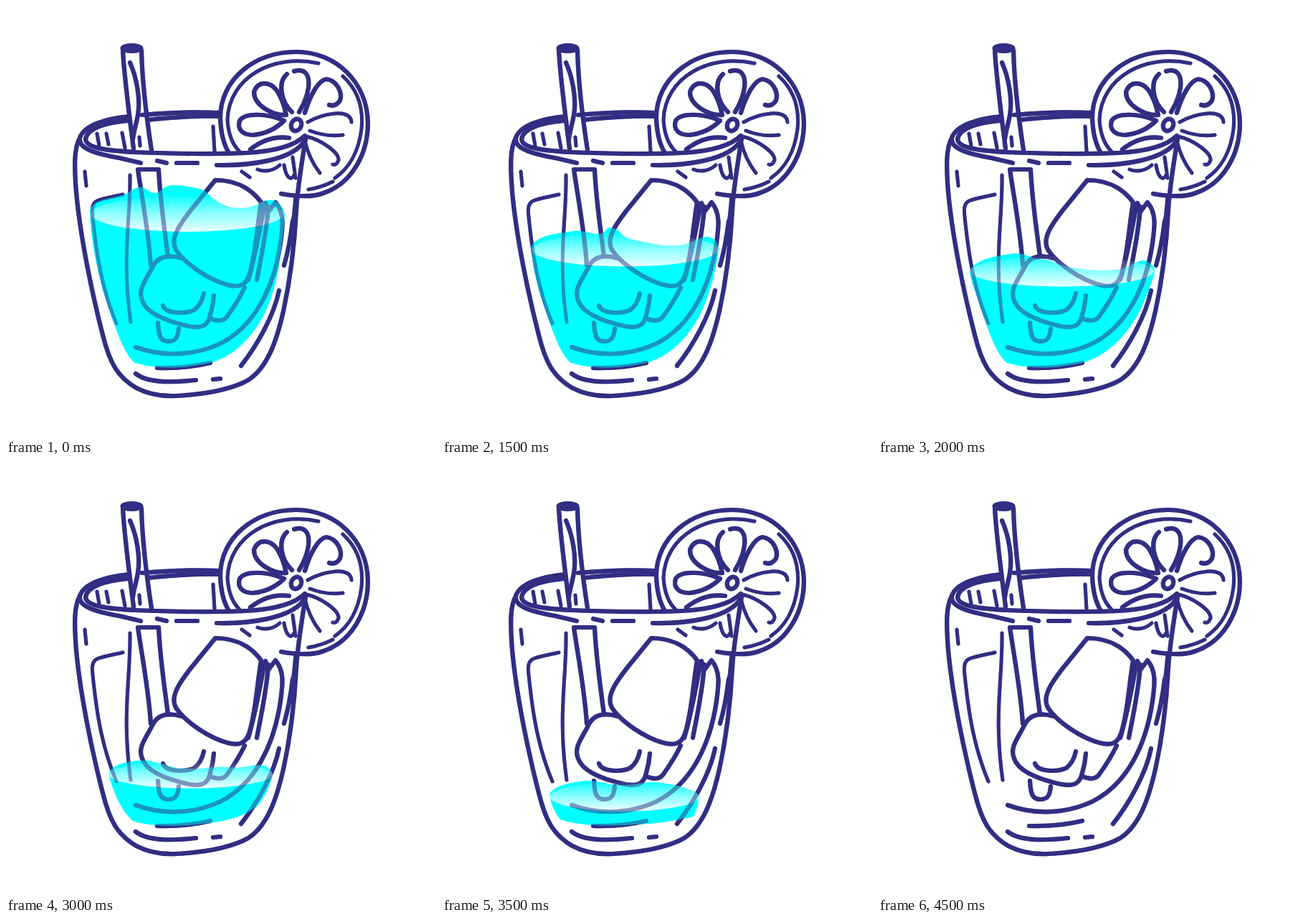
Animation, 600 px wide and 600 px high, one loop 6.5 s. Source, as an HTML page:

```html
<!DOCTYPE html>
<html lang="en">
<head>
<meta charset="utf-8">
<title>Emptying drink</title>
<style>
  html, body { margin: 0; width: 100%; height: 100%; overflow: hidden; background: #fff; }
  svg { display: block; width: 100vw; height: 100vh; }
  .art { fill: none; stroke: #312e83; stroke-width: 6.2; stroke-linecap: round; stroke-linejoin: round; }
  .thin { stroke-width: 5; }
  .bold { stroke-width: 7.4; }
  .solid { fill: #312e83; stroke-width: 2; }
  .level { fill: #0ff; visibility: hidden; animation: show 6500ms step-end infinite; animation-delay: calc(500ms + var(--i) * 500ms); }
  .full { animation-name: showFull; animation-delay: 0ms; }
  .level ellipse { fill: url(#sheen); }
  @keyframes show { 0% { visibility: visible; } 7.6923%, 100% { visibility: hidden; } }
  @keyframes showFull { 0% { visibility: visible; } 15.3846%, 100% { visibility: hidden; } }
</style>
</head>
<body>
<svg viewBox="0 0 600 600">
  <defs>
    <linearGradient id="sheen" x1="0" y1="0" x2="0" y2="1">
      <stop offset="0" stop-color="#fff" stop-opacity=".06"/>
      <stop offset=".5" stop-color="#fff" stop-opacity=".55"/>
      <stop offset="1" stop-color="#fff" stop-opacity=".93"/>
    </linearGradient>
  </defs>

  <g id="art" class="art">
    <!-- glass -->
    <path d="M103 184C95 198 95 222 98 260C104 325 121 405 135 459C144 495 154 517 182 533C201 543 219 545 238 544C273 542 311 537 338 522C364 505 377 470 387 426C397 380 403 325 405 285C407 250 413 220 418 184"/>
    <path class="bold" d="M405 268C403 292 400 315 397 330"/>
    <path d="M400 300C397 325 393 345 388 362"/>
    <path d="M172 154C140 157 109 166 103 184C100 200 130 207 158 212L188 219M190 152C225 149 262 147 298 149"/>
    <path d="M170 160C138 163 113 171 111 186C112 199 145 202 181 204C230 206 290 207 335 205C372 203 402 196 417 181M197 159C232 155 265 153 298 154"/>
    <path d="M211 216L224 219M238 219L267 219M294 222C338 223 402 216 418 186"/>
    <path class="thin" d="M127 178L130 195M140 178L143 193M162 177L166 198M289 168L291 203M110 231L112 251"/>

    <!-- straw -->
    <ellipse class="solid" cx="175.500" cy="59" rx="15" ry="6"/>
    <path d="M163 62C165 98 171 145 178 199M189 62C190 105 196 155 203 201"/>
    <path d="M173 79C182 99 188 130 184 152C182 164 178 176 177 186"/>
    <path class="thin" d="M186 183L187 195"/>
    <path d="M202 362C199 315 190 270 184 228H213C215 272 221 310 226 349M212 442C213 460 215 468 227 468C238 468 240 460 241 450"/>

    <!-- inner walls -->
    <path class="thin" d="M163 263C146 267 136 268 127 272C117 277 121 291 122 304C127 350 134 395 154 443"/>
    <path class="thin" d="M173 236C174 300 161 350 174 441"/>
    <path d="M357 292L362 275L367 286L376 274C389 289 386 309 383 331C374 393 347 447 299 471C263 488 219 490 181 476"/>
    <path d="M366 280C364 315 356 350 350 382M360 282C352 325 345 360 338 382"/>
    <path d="M381 397C374 432 350 474 328 502"/>
    <path d="M211 505C238 506 263 503 285 498M181 513C197 526 230 526 265 522M289 521L299 520"/>

    <!-- ice -->
    <path d="M292 243C318 243 341 253 356 274C350 309 348 351 339 376C334 391 324 393 309 389C283 382 250 360 237 340C228 324 244 303 257 286Z"/>
    <path d="M245 352C228 347 213 348 205 363C196 382 183 395 190 411C196 429 224 440 256 447C275 450 282 445 285 431Q289 418 290 404"/>
    <path d="M219 418C223 430 251 430 263 424Q273 416 276 401"/>
    <path d="M285 436C296 440 303 440 308 434Q324 412 333 393"/>

    <!-- citrus slice -->
    <path d="M384 262C407 266 428 267 443 261C482 248 505 207 505 163C504 106 460 64 405 64C346 64 299 103 299 156Q300 187 311 205"/>
    <path class="thin" d="M436 80C373 66 311 99 309 159Q311 189 326 203M470 98C492 118 499 143 496 172C492 204 478 227 459 240M422 256Q441 253 456 245"/>
    <ellipse cx="405" cy="166" rx="7" ry="8.500" transform="rotate(25 405 166)"/>
    <path d="M399 148C383 133 379 106 392 95M402 91C430 83 426 121 409 148"/>
    <path d="M391 152C371 153 346 138 346 120C352 103 369 106 378 118Q387 132 391 152"/>
    <path d="M388 160C363 149 333 149 326 160C322 173 331 180 345 180C364 178 378 170 388 160"/>
    <path d="M417 149C424 126 435 104 447 102C462 104 470 121 466 132Q460 141 451 138"/>
    <path class="thin" d="M421 162C442 150 481 142 482 162M424 174Q447 183 470 180"/>
    <path class="thin" d="M419 182C441 187 465 205 464 215Q461 223 456 221M417 188Q423 214 438 233"/>
    <path d="M341 200C355 189 374 181 395 184"/>
    <path class="thin" d="M329 231L340 239M351 228C361 232 373 230 382 222M388 222C391 241 398 244 402 236M400 211L404 240"/>
  </g>

  <!-- liquid, one group per level -->
  <g class="level full">
    <path d="M117 286C119 270 145 269 165 263C174 260 174 256 185 253C196 251 196 260 208 261C218 260 216 252 232 250Q257 250 278 258C290 272 306 282 326 282S352 275 364 271Q383 269 389 290C386 330 382 370 372 400C358 450 320 494 275 500C245 506 210 507 180 498C162 485 146 429 135 396Q119 338 117 286Z"/>
    <ellipse cx="253" cy="290" rx="135" ry="25"/>
  </g>
  <g class="level" style="--i:1">
    <path d="M118 308C122 293 148 286 174 282C192 278 197 287 213 286C222 284 217 279 232 277C250 275 254 291 268 297C290 304 312 306 332 306S356 295 368 293Q386 294 389 312C385 340 381 374 372 400C358 450 320 494 275 500C245 506 210 507 180 498C162 485 146 429 135 396Q120 345 118 308Z"/>
    <ellipse cx="253" cy="314" rx="135" ry="25"/>
  </g>
  <g class="level" style="--i:2">
    <path d="M124 337C130 322 153 318 178 315C198 311 205 319 220 318C231 316 226 310 236 309C248 311 249 321 263 325C285 330 308 336 331 334C349 332 357 322 371 322Q386 325 386 341C382 365 379 382 372 400C358 450 320 494 275 500C245 506 210 507 180 498C162 485 146 429 135 396Q126 363 124 337Z"/>
    <ellipse cx="255.500" cy="340" rx="130" ry="23.500"/>
  </g>
  <g class="level" style="--i:3">
    <path d="M128 370C136 354 158 350 184 346C202 343 209 350 222 353C239 352 246 359 265 364C287 368 310 370 332 368C351 366 357 356 370 355Q386 358 386 372C382 386 379 394 374 405C358 450 320 494 275 500C245 506 210 507 180 498C162 485 146 429 137 402Q130 386 128 370Z"/>
    <ellipse cx="257" cy="370" rx="128" ry="21.500"/>
  </g>
  <g class="level" style="--i:4">
    <path d="M135 400C142 389 156 385 174 383C191 379 199 380 210 387C230 399 248 402 281 402C304 401 321 403 340 401C352 399 356 392 367 391Q381 392 381 403C374 427 365 449 351 463C330 483 305 496 275 501C245 506 207 507 180 498C163 483 144 444 135 400Z"/>
    <ellipse cx="258" cy="401" rx="123" ry="19.500"/>
  </g>
  <g class="level" style="--i:5">
    <path d="M143 432C149 420 163 416 183 414C204 411 220 421 239 424C267 428 288 421 309 423C332 425 343 419 355 420Q371 423 372 434C367 453 359 468 350 478C330 493 305 499 275 502C243 506 204 507 177 498C160 483 149 456 143 432Z"/>
    <ellipse cx="257.500" cy="433" rx="114.500" ry="19.500"/>
  </g>
  <g class="level" style="--i:6">
    <path d="M150 461C156 449 176 445 200 442C225 442 232 449 258 448C277 447 285 442 306 445C331 448 350 454 359 462Q357 480 351 492C324 498 300 502 270 503C232 506 190 505 165 496Q153 482 150 461Z"/>
    <ellipse cx="254.500" cy="464" rx="104.500" ry="20.500"/>
  </g>
  <g class="level" style="--i:7">
    <path d="M155 484C166 476 190 474 218 474C251 477 279 474 306 476Q339 478 351 486Q352 493 345 496C306 502 273 505 238 505C207 505 184 504 168 498Q157 492 155 484Z"/>
    <ellipse cx="253" cy="487" rx="98" ry="13"/>
  </g>

  <!-- drawing shows through the liquid -->
  <use href="#art" opacity=".5"/>
</svg>
</body>
</html>
```
